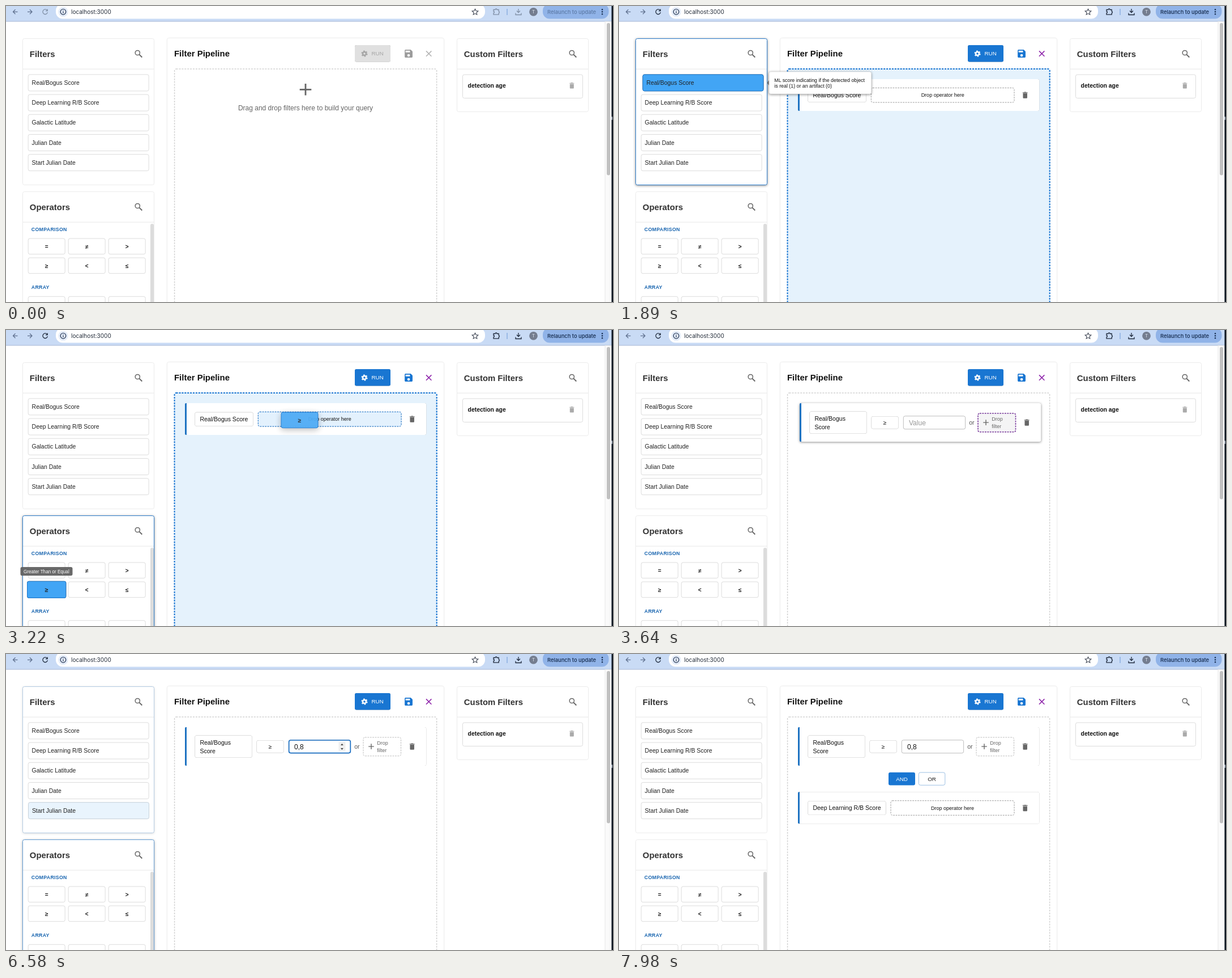
These frames come from a looping animation (1072x522 px, 8 s). An HTML page:

```html
<!DOCTYPE html>
<html lang="en">
<head>
<meta charset="utf-8">
<title>Filter Pipeline</title>
<style>
  html, body { margin: 0; width: 100%; height: 100%; overflow: hidden; background: #fff; }
  svg { display: block; }
  text { font-family: "Liberation Sans", Arial, sans-serif; white-space: pre; }
  .ui { font-family: Inter, "Open Sans", sans-serif; }
  .card { filter: drop-shadow(0 .7px .7px rgba(0,0,0,.42)); }
  .paper { filter: drop-shadow(0 .5px 1.2px rgba(0,0,0,.2)); }
  .lift { filter: drop-shadow(0 1.5px 2px rgba(0,0,0,.45)); }
  .ghost { filter: drop-shadow(0 3px 6px rgba(0,0,0,.28)); }
</style>
</head>
<body>
<svg id="stage" width="1072" height="522" viewBox="0 0 1072 522"></svg>
<script>
const LOOP = 8000, STEP = 70;
const BLUE = '#1976d2', SKY = '#42a5f5';
const stage = document.getElementById('stage');

function el(parent, tag, attrs = {}) {
  const node = document.createElementNS('http://www.w3.org/2000/svg', tag);
  for (const key in attrs) node.setAttribute(key, attrs[key]);
  return parent.appendChild(node);
}
const group = (parent, attrs) => el(parent, 'g', attrs);
const box = (p, x, y, width, height, fill, stroke = 'none', more) =>
  el(p, 'rect', { x, y, width, height, rx: 3, fill, stroke, ...more });
const line = (p, d, stroke, width = 1.3, more) =>
  el(p, 'path', { d, fill: 'none', stroke, 'stroke-width': width, ...more });
const shape = (p, d, fill, more) => el(p, 'path', { d, fill, ...more });
const dot = (p, cx, cy, r, fill, more) => el(p, 'circle', { cx, cy, r, fill, ...more });

// y is the visual middle of the capitals
function text(p, x, y, size, str, fill = '#222', more) {
  const node = el(p, 'text', { x, y: y + size * 0.36, 'font-size': size, fill, ...more });
  node.textContent = str;
  return node;
}
const BOLD = { 'font-weight': 700 };
const MID = { 'text-anchor': 'middle' };

// Icons
function search(p, x, y) {
  dot(p, x - 1.9, y - 1.9, 4.1, 'none', { stroke: '#666', 'stroke-width': 1.5 });
  line(p, `M${x + 1.2} ${y + 1.2}l4.9 4.9`, '#666', 1.9);
}
function trash(p, x, y, fill, size = 15) {
  const k = size / 24;
  shape(p, 'M6 19c0 1.1.9 2 2 2h8c1.1 0 2-.9 2-2V7H6zM19 4h-3.5l-1-1h-5l-1 1H5v2h14z', fill,
    { transform: `translate(${x - 12 * k} ${y - 12 * k}) scale(${k})` });
}
function tools(p, button, label, save, close) {
  box(p, 616, 69, 63, 29.5, button, 'none', { class: 'card' });
  dot(p, 633, 84, 3, 'none', { stroke: label, 'stroke-width': 2.4 });
  dot(p, 633, 84, 4.7, 'none', { stroke: label, 'stroke-width': 1.8, 'stroke-dasharray': '2.6 2.32' });
  text(p, 645.5, 83.7, 9.8, 'RUN', label);
  shape(p, 'M17 3H5c-1.1 0-2 .9-2 2v14c0 1.1.9 2 2 2h14c1.1 0 2-.9 2-2V7zm-5 16a3 3 0 1 1 0-6 3 3 0 0 1 0 6zm3-10H5V5h10z',
    save, { transform: 'translate(701.8 74.8) scale(.77)' });
  line(p, 'M742 79.4l9.4 9.4m0-9.4l-9.4 9.4', close, 1.6);
}

// Browser toolbar
const bar = group(stage);
box(bar, 0, 0, 1072, 27, '#c9dbf5', 'none', { rx: 0 });
box(bar, 0, 26.6, 1072, 1, '#a5b6d4', 'none', { rx: 0 });
box(bar, 88, -4, 758, 26.5, '#fff', 'none', { rx: 12 });
line(bar, 'M20.5 10.3h-8m4-4l-4 4 4 4M38 10.3h8m-4-4l4 4-4 4', '#60718f');
dot(bar, 101, 10.3, 8.6, '#e4ecf9');
dot(bar, 101, 10.3, 4.8, 'none', { stroke: '#20324f', 'stroke-width': 1.2 });
line(bar, 'M101 9.6v3.2M101 7.4v1.2', '#20324f', 1.2);
text(bar, 115, 10.3, 10, 'localhost:3000', '#222b38', { class: 'ui' });
line(bar, 'M828.5 5.2l1.6 3.4 3.7.4-2.8 2.5.8 3.7-3.3-1.9-3.3 1.9.8-3.7-2.8-2.5 3.7-.4z', '#3f4654', 1.1);
line(bar, 'M885 5v11', '#87ace0', 1.4);
dot(bar, 931.5, 10.3, 7.4, '#747d8f');
text(bar, 931.5, 10.3, 8, 'T', '#dfe5ef', { class: 'ui', ...MID });
box(bar, 948, -4, 116.5, 26.5, '#90b3e8', 'none', { rx: 12 });
for (const y of [6.3, 10.3, 14.3]) dot(bar, 1053, y, 1.2, '#13294b');
const awake = group(bar);
line(awake, 'M72.6 7.6a4.3 4.3 0 1 0 .8 3.6M73.2 5.6v3h-3', '#1f2a3c');
line(awake, 'M861 6.5h3a1.5 1.5 0 0 1 3 0h3.2v3a1.6 1.6 0 0 1 0 3.1v2.6h-9.2v-2.7a1.5 1.5 0 0 0 0-3z', '#1f2a3c');
line(awake, 'M905 5v6.5m-3-3l3 3 3-3M900 12.5v3h10v-3', '#1f2a3c');
text(awake, 956, 10.5, 9.35, 'Relaunch to update', '#13294b', { class: 'ui', 'font-weight': 500 });

// Page scrollbar and window edge
box(stage, 1058, 27.6, 11.5, 495, '#fafafa', '#e8e8e8', { rx: 0 });
box(stage, 1061, 30, 6, 268.5, '#c1c1c1');
box(stage, 1069.5, 0, 3, 522, '#0b141e', 'none', { rx: 0 });
box(stage, 1069, 195, 2, 6, '#b9c2cc', 'none', { rx: 1 });

// Side panels
function panel(x, y, h, title) {
  const g = group(stage);
  const edge = [x, y, 232, h];
  box(g, ...edge, '#fff', '#ebebeb');
  const glow = box(g, ...edge, '#fff', '#2f7fcd', { class: 'lift', opacity: 0 });
  line(g, `M${x + .5} ${y + 53.7}h231`, '#e8e8e8', 1);
  text(g, x + 12.3, y + 27.2, 14.9, title, '#333', BOLD);
  search(g, x + 204.7, y + 26.9);
  return { g, glow };
}
const filters = panel(29.5, 57.5, 258, 'Filters');
const operators = panel(29.5, 327.5, 240, 'Operators');
const custom = panel(796.5, 57.5, 129, 'Custom Filters');

function filterTile(p, x, y, label, hot) {
  const g = group(p, hot === 'ghost' ? { class: 'ghost' } : {});
  const fill = hot ? '#50acf5' : '#fff';
  box(g, x, y, 213, 29, fill, hot ? '#1f7bd0' : '#dcdcdc');
  const glow = box(g, x, y, 213, 29, SKY, '#1f7bd0', { class: 'card', opacity: 0 });
  text(g, x + 6.4, y + 14.4, 10.45, label, hot ? '#24496c' : '#222');
  return { g, glow };
}
const NAMES = ['Real/Bogus Score', 'Deep Learning R/B Score', 'Galactic Latitude', 'Julian Date', 'Start Julian Date'];
const tiles = NAMES.map((name, i) => filterTile(filters.g, 39.2, 120.9 + i * 35.2, name));

const og = operators.g;
box(og, 255, 384, 6, 150, '#dcdcdc');
const CAPS = { 'font-weight': 700, 'letter-spacing': .3 };
text(og, 44.8, 394, 8.8, 'COMPARISON', '#1a66b0', CAPS);
text(og, 44.8, 496, 8.8, 'ARRAY', '#1a66b0', CAPS);
const keys = ['=', '≠', '>', '≥', '<', '≤', 'in', 'not in', 'all'].map((sign, i) => {
  const x = 39.2 + (i % 3) * 71, y = [410, 444, 512.3][Math.floor(i / 3)];
  const g = group(og);
  box(g, x, y, 65, 27.7, '#fff', '#dcdcdc');
  const glow = box(g, x, y, 65, 27.7, SKY, '#1f7bd0', { class: 'card', opacity: 0 });
  text(g, x + 32.5, y + 14, 10, sign, '#222', { ...BOLD, ...MID });
  return { g, glow };
});

box(custom.g, 806.5, 121, 212, 41.5, '#fff', '#dcdcdc');
text(custom.g, 815.5, 140, 10.45, 'detection age', '#111', BOLD);
trash(custom.g, 999.3, 140.3, '#aaa', 14);

// Pipeline
box(stage, 285, 57, 488, 500, '#fff', 'none', { class: 'paper' });
text(stage, 297, 83.7, 14.95, 'Filter Pipeline', '#111', BOLD);
const idleTools = group(stage), liveTools = group(stage);
tools(idleTools, '#e0e0e0', '#a6a6a6', '#9c9c9c', '#b4b4b4');
tools(liveTools, BLUE, '#fff', BLUE, '#8e24aa');
const dashed = (p, x, y, w, h, fill, stroke, width = 1, dash = '2.8 1.6') =>
  box(p, x, y, w, h, fill, stroke, { 'stroke-width': width, 'stroke-dasharray': dash });
const zone = (fill, stroke, width) => dashed(stage, 297.6, 111, 463, 430, fill, stroke, width, '3 1.9');
zone('none', '#d2d2d2', 1.5);
const zoneReady = zone('none', BLUE, 1.5);
const zoneOver = zone('#e5f2fc', BLUE, 1.9);

const hint = group(stage);
line(hint, 'M529 137v20.6M518.7 147.3h20.6', '#666', 2.8);
text(hint, 529, 179.5, 12, 'Drag and drop filters here to build your query', '#666', MID);

function block(y, h) {
  const g = group(stage);
  const shade = box(g, 316, y, 426.3, h, '#fff', 'none', { class: 'lift' });
  box(g, 316, y, 426.3, h, '#fff', 'none', { class: 'card' });
  shape(g, `M319 ${y}v${h}h-1a2 2 0 0 1 -2 -2v${4 - h}a2 2 0 0 1 2 -2z`, '#1f73c2');
  return { g, shade };
}
const chip = (p, x, y, w, h) => box(p, x, y, w, h, '#fff', '#ececec', { class: 'card', 'stroke-width': .6 });
function openBlock(y, label, chipWidth, slotX) {
  const b = block(y, 56);
  chip(b.g, 333.7, y + 16.2, chipWidth, 24.2);
  text(b.g, 342.4, y + 28.3, 10.55, label, '#111');
  dashed(b.g, slotX, y + 15.4, 698 - slotX, 25.6, '#fff', '#9a9a9a');
  b.slot = dashed(b.g, slotX, y + 15.4, 698 - slotX, 25.6, '#e3f1fd', BLUE);
  text(b.g, (slotX + 698) / 2, y + 28.2, 9, 'Drop operator here', '#111', MID);
  trash(b.g, 717.2, y + 28.2, '#666');
  return b;
}
const first = openBlock(129, NAMES[0], 102.7, 445.3);
const second = openBlock(243.3, NAMES[1], 137.5, 480);

const ready = block(129, 68);
const rg = ready.g;
chip(rg, 333.7, 143.8, 100.7, 38.8);
text(rg, 342.4, 156, 10.55, 'Real/Bogus', '#111');
text(rg, 342.4, 170.8, 10.55, 'Score', '#111');
chip(rg, 442.8, 152.4, 47.6, 21.6);
text(rg, 466.5, 163.3, 10, '≥', '#111', MID);
box(rg, 499.3, 151.8, 109.3, 23, '#fff', '#bdbdbd');
const inputHover = box(rg, 499.3, 151.8, 109.3, 23, 'none', '#333');
const inputFocus = box(rg, 499.7, 152, 108.6, 22.6, 'none', '#1a6fc4', { 'stroke-width': 1.7 });
const value = text(rg, 509, 163.4, 12, 'Value');
const spinner = group(rg);
box(spinner, 587.5, 155, 12, 16.4, '#efefef', 'none', { rx: 1 });
const press = box(spinner, 587.5, 155, 12, 8.2, '#cfcfcf', 'none', { rx: 1 });
shape(spinner, 'M591 161l2.4-3 2.4 3zM591 166l2.4 3 2.4-3z', '#444');
text(rg, 615.2, 163.3, 10.5, 'or', '#555');
dashed(rg, 631, 147, 66.5, 32.8, '#fff', '#bbb');
const orHover = dashed(rg, 631, 147, 66.5, 32.8, '#f4f4f5', '#7b3a9e', 1.6);
line(rg, 'M645 158.3v9.6M640.2 163.1h9.6', '#666', 1.4);
text(rg, 655.2, 156.8, 9, 'Drop', '#666');
text(rg, 655.2, 169.4, 9, 'filter', '#666');
trash(rg, 717.2, 163.2, '#666');

const logic = group(stage);
box(logic, 476, 208.7, 47, 22.8, BLUE);
box(logic, 529.3, 208.9, 46.5, 22.4, '#fff', '#9dc0e4');
text(logic, 499.5, 220, 9.8, 'AND', '#fff', MID);
text(logic, 552.5, 220, 9.8, 'OR', '#222', MID);

// Tooltips
function tip(x, y, lines) {
  const g = group(stage);
  box(g, x, y, 180.5, 39, '#fff', '#ddd', { class: 'lift', 'stroke-width': .7 });
  shape(g, `M${x} ${y + 15}l-4 4.5 4 4.5z`, '#777');
  lines.forEach((str, i) => text(g, x + 9.3, y + 14.4 + i * 10.4, 8.83, str, '#111'));
  return g;
}
const scoreTip = tip(265, 116, ['ML score indicating if the detected object', 'is real (1) or an artifact (0)']);
const deepTip = tip(265.7, 151, ['Deep learning model score for real (1) vs', 'artifact (0) classification']);
const signTip = group(stage);
box(signTip, 25.5, 418, 92, 15.2, '#616161', 'none', { opacity: .95 });
text(signTip, 31, 425.6, 8.15, 'Greater Than or Equal', '#fff');

// Dragged copies, drawn at 0,0
const scoreGhost = filterTile(stage, 0, 0, NAMES[0], 'ghost').g;
const deepGhost = filterTile(stage, 0, 0, NAMES[1], 'ghost').g;
const signGhost = group(stage, { class: 'ghost', opacity: .92 });
box(signGhost, 0, 0, 65, 27.7, '#50acf5', '#1f7bd0');
text(signGhost, 32.5, 14, 10, '≥', '#222', { ...BOLD, ...MID });

// Motion
const ramp = (t, from, to) => Math.min(1, Math.max(0, (t - from) / (to - from)));
const pulse = (t, on, off, span = 210) => ramp(t, on, on + span) * (1 - ramp(t, off, off + span));
const fade = (node, k) => {
  node.setAttribute('opacity', k);
  node.style.display = k > 0 ? '' : 'none';
};
const within = (t, a, b) => t >= a && t < b ? 1 : 0;
const shift = (b, k) => {
  b.g.setAttribute('transform', `translate(${3 * k} 0)`);
  fade(b.shade, k);
};

// Points are [time, x, y]; the copy shows from the first time until `end`.
function drag(node, t, end, points) {
  fade(node, within(t, points[0][0], end) * .95);
  let i = 0;
  while (i < points.length - 2 && t >= points[i + 1][0]) i++;
  const [t0, x0, y0] = points[i], [t1, x1, y1] = points[i + 1];
  const k = ramp(t, t0, t1);
  node.setAttribute('transform', `translate(${x0 + (x1 - x0) * k} ${y0 + (y1 - y0) * k})`);
}

const DROP1 = 1890, DROP2 = 3360, DROP3 = 7560;

function render(t) {
  fade(awake, t < 70 ? .42 : t < 210 ? .85 : 1);

  fade(filters.glow, pulse(t, 770, DROP1) + pulse(t, 6520, DROP3));
  fade(operators.glow, pulse(t, 2310, DROP2) + pulse(t, 6230, 6520));
  const hover = [
    pulse(t, 900, DROP1), pulse(t, 6840, DROP3),
    pulse(t, 6720, 6820, 180), pulse(t, 6630, 6740, 180), pulse(t, 6560, 6660, 180)
  ];
  tiles.forEach((tile, i) => {
    fade(tile.glow, hover[i]);
    tile.g.setAttribute('transform', `translate(${2.8 * hover[i]} 0)`);
  });
  const key = pulse(t, 2450, DROP2), scale = 1 + .05 * key;
  fade(keys[3].glow, key);
  keys[3].g.setAttribute('transform', `translate(71.7 458) scale(${scale}) translate(-71.7 -458)`);
  fade(scoreTip, pulse(t, 1050, DROP1, 140));
  fade(deepTip, pulse(t, 6950, DROP3, 140));
  fade(signTip, pulse(t, 2560, DROP2, 140));

  fade(idleTools, t < DROP1 ? 1 : 0);
  fade(liveTools, t < DROP1 ? 0 : 1);
  fade(hint, t < DROP1 ? 1 : 0);
  fade(zoneReady, pulse(t, 1400, DROP1) + pulse(t, 2710, DROP2) + pulse(t, 7070, DROP3));
  fade(zoneOver, pulse(t, 1540, DROP1, 140) + pulse(t, 2870, DROP2, 140) + pulse(t, 7180, DROP3, 140));

  fade(first.g, within(t, DROP1, DROP2));
  fade(first.slot, pulse(t, 2940, DROP2, 70));
  shift(first, pulse(t, DROP1, 2240));
  fade(ready.g, t < DROP2 ? 0 : 1);
  shift(ready, pulse(t, DROP2, 6090));
  fade(second.g, t < DROP3 ? 0 : 1);
  fade(second.slot, 0);
  shift(second, pulse(t, DROP3, 7690));
  fade(logic, t < DROP3 ? 0 : 1);

  fade(orHover, pulse(t, 3410, 3940));
  fade(inputHover, pulse(t, 3940, 4480));
  fade(inputFocus, pulse(t, 4430, 7000, 140));
  fade(spinner, within(t, 3990, 7000));
  fade(press, within(t, 4480, 5390) + within(t, 5880, 5950));
  const digit = t < 5670 ? Math.min(6, 1 + Math.floor((t - 4600) / 100)) : t < 5880 ? 7 : 8;
  value.textContent = t < 4600 ? 'Value' : '0,' + digit;
  value.setAttribute('fill', t < 4600 ? '#999' : '#111');

  drag(scoreGhost, t, DROP1, [[1400, 42, 121], [1470, 75, 125], [1680, 300, 150], [1890, 345, 165]]);
  drag(signGhost, t, DROP2, [[2700, 39, 444], [2800, 91.3, 421], [2940, 410, 230], [3010, 487, 184], [3220, 486, 145]]);
  drag(deepGhost, t, DROP3, [[7070, 42, 156], [7210, 170, 205], [7350, 329.5, 251.5], [7490, 345, 268]]);
}

function tick() {
  const t = performance.now() % LOOP;
  render(Math.floor(t / STEP) * STEP);
  requestAnimationFrame(tick);
}
tick();
</script>
</body>
</html>
```
